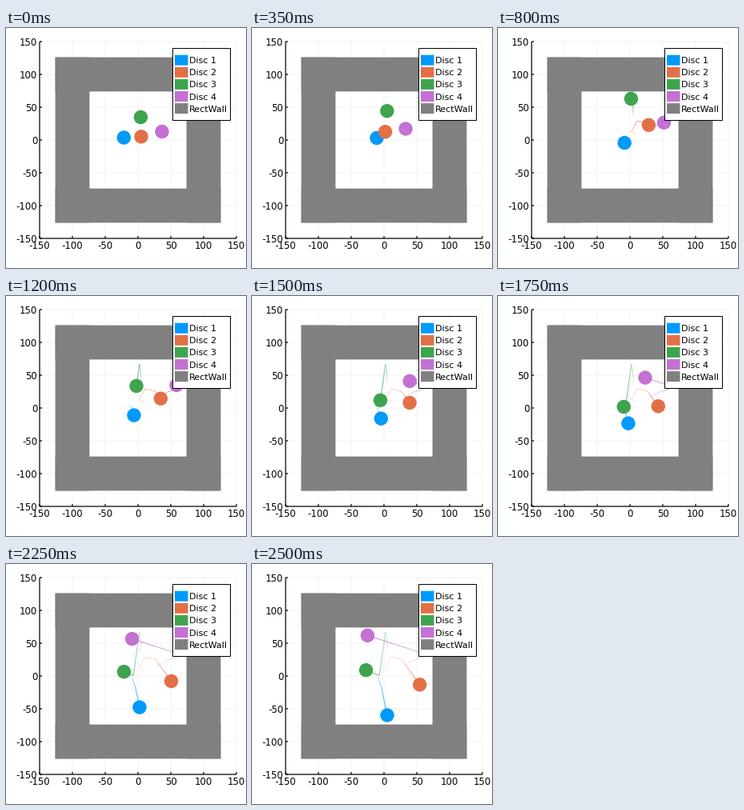
A matplotlib script that plays this animation: 300 by 300 pixels, repeating every 2550 ms.

```python
import numpy as np
import matplotlib.pyplot as plt
from matplotlib.animation import FuncAnimation
from matplotlib.collections import LineCollection
from matplotlib.colors import to_rgb
from matplotlib.patches import Circle, Rectangle

SIZE, DPI = 300, 100
FRAMES, INTERVAL = 51, 50
PX = 72 / DPI                      # one pixel in points
LEFT, RIGHT, TOP, BOTTOM = 42, 288, 17, 263
CX, CY, SCALE = 165, 140, 0.82     # plot centre, pixels per unit
RADIUS = 8.7
X_MAX, Y_MIN = 220.8, 85.2         # where discs bounce off the walls
STEPS = 4                          # trail samples per frame
GREY = "#808080"
COLORS = ["#009AFA", "#E36F47", "#3EA44E", "#C371D2"]

# Discs glide straight between collisions
STARTS = [(147.3, 137), (169, 135.8), (168.4, 111.5), (195, 129.5)]
ENDS = [(169, 189), (209.7, 150.8), (142.5, 132.7), (144.4, 89.3)]
# Time in frames, then the place of each disc that collides
HITS = [
    (3.6, {1: (173, 131.2), 3: (187.5, 128.9)}),
    (7.1, {0: (156.1, 137.5), 1: (166.4, 129.7)}),
    (9.75, {1: (174, 116), 2: (169, 100.6)}),
    (13.4, {1: (186.7, 119), 3: (200.6, 120.5)}),
    (33, {0: (162, 155.2), 2: (159.2, 139.3)}),
]


def build_path(disc):
    """Key points with each wall bounce unfolded into a straight run."""
    path = [(0, *STARTS[disc])]
    path += [(t, *places[disc]) for t, places in HITS if disc in places]
    path.append((FRAMES - 1, *ENDS[disc]))
    t, x, y = np.array(path).T
    if disc == 2:
        y[2] = 2 * Y_MIN - y[2]    # bounces off the top wall
    if disc == 3:
        x[-1] = 2 * X_MAX - x[-1]  # bounces off the right wall
    return t, x, y


def position(path, t, disc):
    times, xs, ys = path
    x, y = np.interp(t, times, xs), np.interp(t, times, ys)
    return np.column_stack([X_MAX - abs(X_MAX - x), Y_MIN + abs(y - Y_MIN)])


def whole_track(disc):
    """Samples of the full run, split at the last hit where it matters."""
    t, x, y = build_path(disc)
    grid = np.linspace(0, FRAMES - 1, (FRAMES - 1) * STEPS + 1)
    track = position((t, x, y), grid, disc)
    if disc == 2:
        late = grid >= t[2]
        y[2] = 2 * Y_MIN - y[2]
        track[late] = position((t, x, y), grid[late], disc)
    return track


TRACKS = [whole_track(d) for d in range(len(COLORS))]

fig = plt.figure(figsize=(SIZE / DPI, SIZE / DPI), dpi=DPI, facecolor="white")
ax = fig.add_axes([0, 0, 1, 1])
ax.set_xlim(0, SIZE)
ax.set_ylim(SIZE, 0)
ax.axis("off")


def line(x, y, color="black", width=1.2, z=6):
    ax.plot(x, y, color=color, lw=width * PX, zorder=z, snap=False,
            solid_capstyle="butt")


def box(x0, y0, x1, y1, z, face, edge="none"):
    ax.add_patch(Rectangle((x0, y0), x1 - x0, y1 - y0, facecolor=face,
                           edgecolor=edge, lw=PX, zorder=z, snap=False))


def label(x, y, text, size, ha):
    ax.text(x, y, text, fontsize=size * PX, family="DejaVu Sans",
            ha=ha, va="center_baseline", zorder=9)


def draw_axes():
    for value in range(-150, 151, 50):
        x, y = CX + SCALE * value, CY - SCALE * value
        line([x, x], [TOP, BOTTOM], "#F2F2F2", 1, 1)
        line([LEFT, RIGHT], [y, y], "#F2F2F2", 1, 1)
        line([x, x], [BOTTOM - 3, BOTTOM])
        line([LEFT, LEFT + 3], [y, y])
        label(x, 271.3, str(value), 11.7, "center")
        label(39.3, y, str(value), 11.7, "right")
    line([LEFT, LEFT], [TOP, BOTTOM])
    line([LEFT, RIGHT], [BOTTOM, BOTTOM])


def draw_walls():
    outer, inner = 103.4, 60.6
    for a, b in [(-outer, -inner), (inner, outer)]:
        box(CX + a, CY - outer, CX + b, CY + outer, 5, GREY)
        box(CX - outer, CY + a, CX + outer, CY + b, 5, GREY)


def draw_legend():
    box(208.5, 25.5, 280.5, 115.5, 7, "white", "black")
    names = [f"Disc {i + 1}" for i in range(len(COLORS))] + ["RectWall"]
    for i, (name, color) in enumerate(zip(names, COLORS + [GREY])):
        y = 40.2 + 15.1 * i
        box(211, y - 6.5, 227.5, y + 6.5, 8, color)
        label(229.2, y, name, 11.1, "left")


draw_axes()
draw_walls()
draw_legend()

trails, discs = [], []
for color, track in zip(COLORS, TRACKS):
    trails.append(ax.add_collection(
        LineCollection([], linewidths=PX, zorder=2), autolim=False))
    discs.append(ax.add_patch(
        Circle(track[0], RADIUS, facecolor=color, lw=0, zorder=3)))


def update(n):
    count = n * STEPS
    for color, track, trail, disc in zip(COLORS, TRACKS, trails, discs):
        points = track[:count + 1]
        disc.center = points[-1]
        # Opacity grows from the start of the run to the present
        rgba = np.ones((count, 4))
        rgba[:, :3] = to_rgb(color)
        rgba[:, 3] = np.linspace(0, 1, count)
        trail.set_segments(np.stack([points[:-1], points[1:]], axis=1))
        trail.set_color(rgba)
    return trails + discs


anim = FuncAnimation(fig, update, frames=FRAMES, interval=INTERVAL,
                     repeat=True, repeat_delay=0)
plt.show()
```
